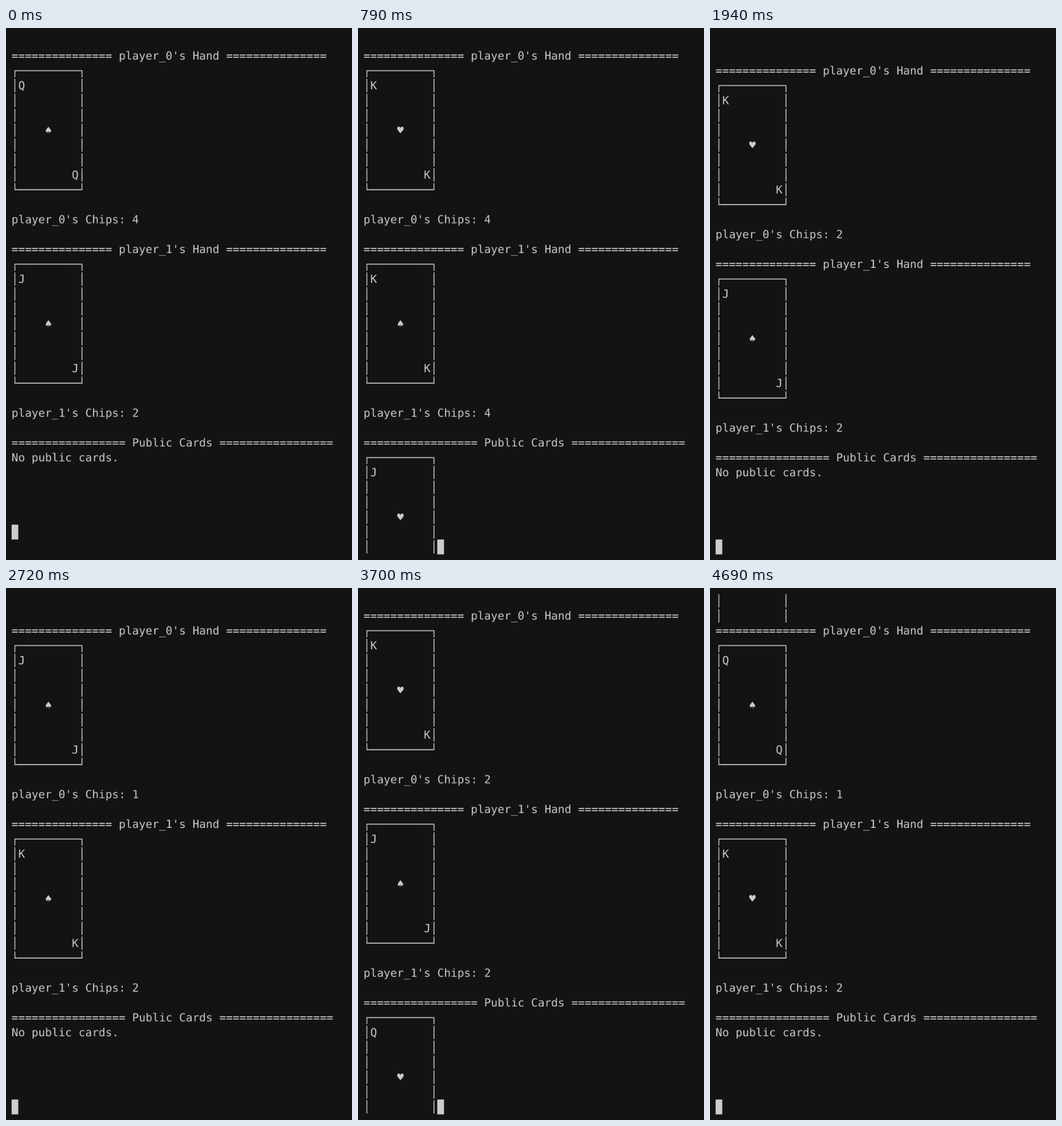
An HTML page with a canvas for the animation above (5690 ms loop, 604 by 927 pixels).

```html
<!DOCTYPE html>
<html lang="en">
<head>
<meta charset="utf-8">
<title>Card game in a terminal</title>
<style>
  html, body { margin: 0; width: 100%; height: 100%; overflow: hidden; background: #121314; }
  canvas { display: block; width: 604px; height: 927px; }
</style>
</head>
<body>
<canvas id="term" width="746" height="1144"></canvas>
<script>
const LOOP = 5690, ROWS = 35;
// Terminal cells are laid out at 24px type, then scaled down to the stage.
const PAD = 12, COL = 14.449, ROW = 32, BASELINE = 24;

// start ms | hand 0, hand 1 | chips 0, chips 1 | public card or - | leftover rows on top
const states = `
0 Q♠ J♠ 4 2 - 0
200 Q♠ J♠ 6 6 K♥ 0
400 Q♠ J♠ 6 10 K♥ 1
590 K♥ K♠ 4 2 - 2
790 K♥ K♠ 4 4 J♥ 0
980 J♥ Q♥ 4 2 - 2
1170 J♥ Q♥ 4 4 K♥ 0
1360 J♥ Q♥ 4 8 K♥ 1
1560 K♠ J♥ 2 4 - 2
1750 Q♥ K♠ 1 2 - 0
1940 K♥ J♠ 2 2 - 0
2140 K♥ J♠ 6 4 - 0
2330 K♥ Q♠ 4 2 - 0
2530 K♥ Q♠ 4 6 - 0
2720 J♠ K♠ 1 2 - 0
2920 Q♥ J♠ 4 4 K♥ 0
3120 Q♥ J♠ 8 4 K♥ 1
3310 K♠ Q♥ 1 2 - 2
3510 Q♠ J♥ 2 4 - 0
3700 K♥ J♠ 2 2 Q♥ 0
3900 Q♥ J♠ 1 2 - 2
4100 J♥ K♥ 2 4 - 0
4300 Q♥ J♥ 2 2 K♠ 0
4490 Q♥ J♥ 10 6 K♠ 1
4690 Q♠ K♥ 1 2 - 2`.trim().split("\n").map(line => {
  const [start, h0, h1, c0, c1, pub, left] = line.split(" ");
  return { start: +start, hands: [h0, h1], chips: [c0, c1], pub, left: +left };
});

const side = "│" + " ".repeat(9) + "│";
const title = (text, n) => "=".repeat(n) + ` ${text} ` + "=".repeat(n);

function card([rank, suit]) {
  const gap = " ".repeat(8), half = " ".repeat(4);
  return [
    "┌" + "─".repeat(9) + "┐",
    `│${rank}${gap}│`, side, side,
    `│${half}${suit}${half}│`, side, side,
    `│${gap}${rank}│`,
    "└" + "─".repeat(9) + "┘"
  ];
}

function screen(s) {
  const hasPublic = s.pub !== "-";
  // The first screen and those with a public card start one row higher.
  const top = hasPublic || s.start === 0 ? 1 : 2;
  const rows = Array.from({ length: top }, (_, i) => i < s.left ? side : "");
  s.hands.forEach((hand, i) => rows.push(
    title(`player_${i}'s Hand`, 15), ...card(hand), "",
    `player_${i}'s Chips: ${s.chips[i]}`, ""
  ));
  rows.push(title("Public Cards", 17));
  rows.push(...(hasPublic ? card(s.pub) : ["No public cards."]));
  return {
    rows: rows.slice(0, ROWS),
    col: hasPublic ? 11 : 0,
    row: hasPublic ? ROWS - 1 : top + 32
  };
}

const screens = states.map(screen);
const canvas = document.getElementById("term");
const ctx = canvas.getContext("2d", { alpha: false });
ctx.font = '24px "DejaVu Sans Mono", monospace';
ctx.textRendering = "geometricPrecision";
let shown = -1;

function paint({ rows, col, row }) {
  ctx.fillStyle = "#121314";
  ctx.fillRect(0, 0, canvas.width, canvas.height);
  ctx.fillStyle = "#ccc";
  rows.forEach((text, i) => ctx.fillText(text, PAD, PAD + i * ROW + BASELINE));
  ctx.fillRect(PAD + col * COL, PAD + row * ROW, COL, ROW);
}

function tick() {
  const t = performance.now() % LOOP;
  const i = states.findLastIndex(s => s.start <= t);
  if (i !== shown) paint(screens[shown = i]);
  requestAnimationFrame(tick);
}
tick();
</script>
</body>
</html>
```
